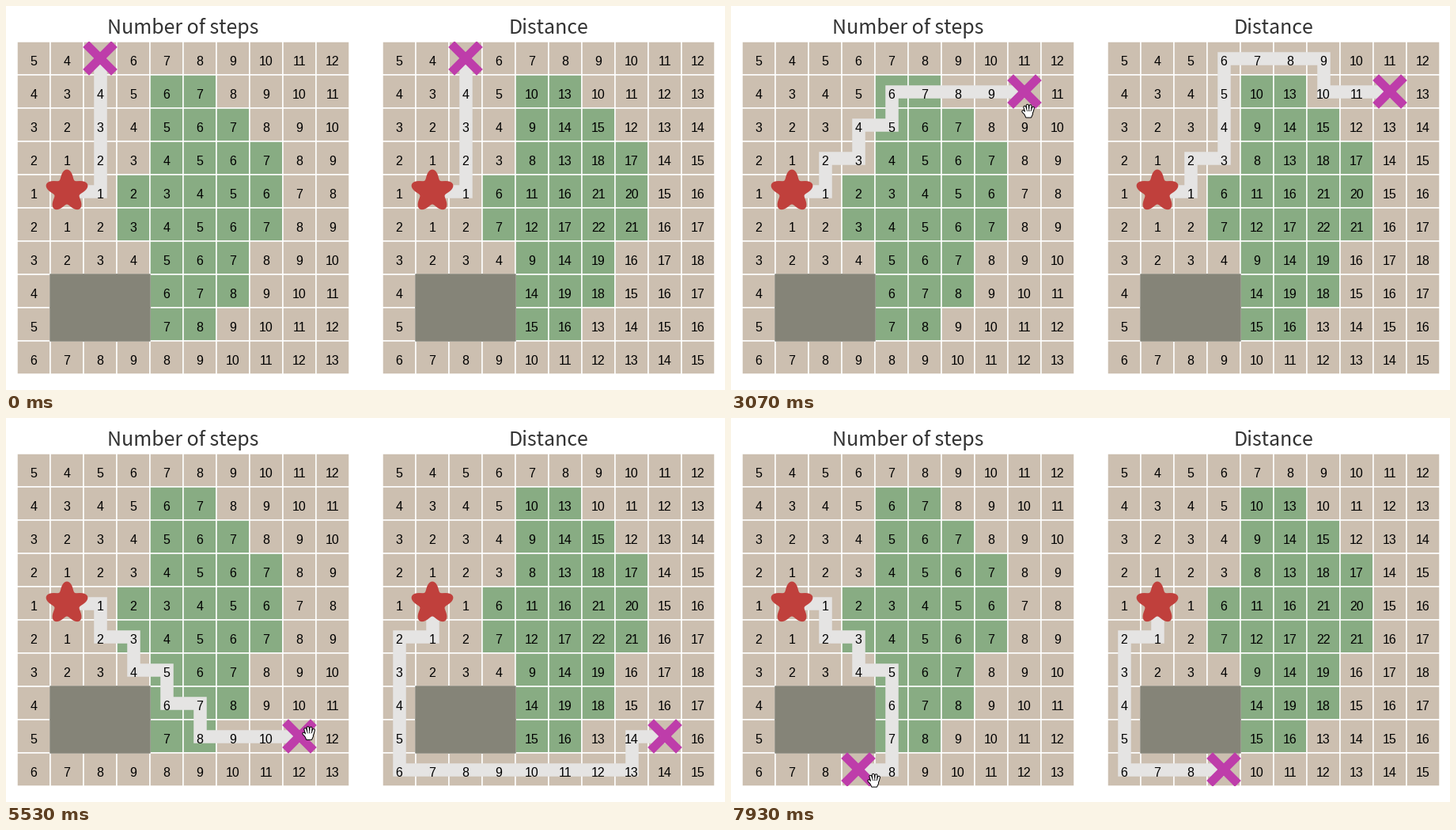
Animation, 909 px wide and 485 px high, one loop 8000 ms. Source, as a matplotlib script:

```python
import math

import matplotlib.pyplot as plt
import numpy as np
from matplotlib.animation import FuncAnimation
from matplotlib.collections import PatchCollection
from matplotlib.patches import Polygon, Rectangle

W, H, DPI = 909, 485, 128
FRAMES, LOOP = 120, 8000
PT = 72 / DPI  # points per pixel
N, CELL, TOP = 10, 42, 45
LEFTS = (14, 476)
START = (1, 4)

SAND, GREEN, WALL = "#ccbfb0", "#88ac83", "#858478"
ROUTE, GOAL, STAR, INK = "#e5e4e3", "#be3daa", "#c0403c", "#333333"

# first and last green column of rows 1 to 8
FOREST = [(4, 5), (4, 6), (4, 7), (3, 7), (3, 7), (4, 6), (4, 6), (4, 5)]
forest = {(x, y) for y, (a, b) in enumerate(FOREST, 1) for x in range(a, b + 1)}
walls = {(x, y) for x in (1, 2, 3) for y in (7, 8)}
cells = [(x, y) for y in range(N) for x in range(N) if (x, y) not in walls]

# pointer: time, x, y
TRACK = np.array([
    (70, 866, 294), (400, 500, 170), (700, 180, 72), (870, 124, 63),
    (1000, 124, 66), (1200, 124, 66), (1730, 201, 70), (2070, 250, 72),
    (2930, 374, 120), (3070, 376, 133), (3600, 394, 186), (4130, 393, 236),
    (5070, 395, 343), (5400, 386, 392), (5530, 380, 404), (6200, 364, 452),
    (7930, 174, 458), (8000, 170, 458)])
GRAB = 1200


def neighbours(cell):
    x, y = cell
    near = [(x + 1, y), (x - 1, y), (x, y + 1), (x, y - 1)]
    return [c for c in near if c in open_cells]


open_cells = set(cells)


def flood(forest_cost):
    """Travel cost from the start to every open cell."""
    cost = {c: forest_cost if c in forest else 1 for c in cells}
    dist = {c: math.inf for c in cells}
    dist[START] = 0
    queue = [START]
    while queue:
        here = queue.pop(0)
        for c in neighbours(here):
            if dist[here] + cost[c] < dist[c]:
                dist[c] = dist[here] + cost[c]
                queue.append(c)
    return dist, cost


def anchor(cell, weighted):
    """Corner from which equally short routes fan out."""
    x, y = cell
    if weighted and x >= 6:
        return (6, 1) if y <= 6 else (6, 9)
    return START


def route(goal, dist, cost, weighted):
    path = [goal]
    while path[-1] != START:
        here = path[-1]
        ax_, ay_ = anchor(here, weighted)
        dx, dy = abs(here[0] - ax_), abs(here[1] - ay_)
        flat = dx > dy or (dx == dy and here[0] < START[0])
        options = [c for c in neighbours(here)
                   if dist[c] + cost[here] == dist[here]]
        path.append(max(options, key=lambda c: ((c[1] == here[1]) == flat, c[0])))
    return path


def centre(cell, left):
    return left + CELL * (cell[0] + 0.5), TOP + CELL * (cell[1] + 0.5)


fig = plt.figure(figsize=(W / DPI, H / DPI), dpi=DPI, facecolor="white")
ax = fig.add_axes([0, 0, 1, 1])
ax.set_xlim(0, W)
ax.set_ylim(H, 0)
ax.axis("off")


class Panel:
    def __init__(self, left, title, forest_cost):
        self.left, self.weighted = left, forest_cost > 1
        self.dist, self.cost = flood(forest_cost)
        ax.text(left + 210, 35, title, ha="center", va="baseline", color=INK,
                family="Noto Sans CJK JP", size=25 * PT)

        order = cells + sorted(walls)
        boxes = [Rectangle((left + CELL * x, TOP + CELL * y), CELL, CELL)
                 for x, y in order]
        fills = [WALL if c in walls else GREEN if c in forest else SAND
                 for c in order]
        edges = [WALL if c in walls else "white" for c in order]
        ax.add_collection(PatchCollection(
            boxes, facecolors=fills, edgecolors=edges, linewidths=1.5 * PT,
            zorder=1))

        self.line, = ax.plot([], [], color=ROUTE, lw=16.5 * PT, zorder=2,
                             solid_capstyle="butt", solid_joinstyle="miter")
        self.labels = {}
        for c in cells:
            if c != START:
                x, y = centre(c, left)
                self.labels[c] = ax.text(
                    x, y + 9, str(self.dist[c]), ha="center", va="baseline",
                    family="Liberation Sans", size=16 * PT, color="black",
                    zorder=3)

        a = np.linspace(0, 2 * np.pi, 120, endpoint=False)
        r = 22 + 5.5 * np.cos(5 * a)
        x, y = centre(START, left)
        ax.add_patch(Polygon(np.c_[x + r * np.sin(a), y - r * np.cos(a)],
                             fc=STAR, ec="none", zorder=4))

        frame = Rectangle((left, TOP), CELL * N, CELL * N, fc="none", ec="none")
        ax.add_patch(frame)
        self.cross, = ax.plot([], [], color=GOAL, lw=11 * PT, zorder=5,
                              solid_capstyle="butt")
        self.cross.set_clip_path(frame)

    def show(self, goal):
        path = route(goal, self.dist, self.cost, self.weighted)
        self.line.set_data(*zip(*(centre(c, self.left) for c in path)))
        for c, label in self.labels.items():
            label.set_visible(c != goal)
        x, y = centre(goal, self.left)
        d = 17.9
        self.cross.set_data([x - d, x + d, np.nan, x - d, x + d],
                            [y - d, y + d, np.nan, y + d, y - d])


panels = [Panel(LEFTS[0], "Number of steps", 1),
          Panel(LEFTS[1], "Distance", 5)]

GAP = (np.nan, np.nan)
FINGERS = np.array([
    (-3, 0), (-4.6, -5), GAP, (-0.5, -1), (-1.2, -7), GAP,
    (2.2, -1), (2.6, -6.5), GAP, (4.6, 1), (6, -4), GAP, (-3, 4), (-6.6, 0.5)])
PALM = np.array([(-4, 0), (5, 0), (5, 4), (3.2, 7.8), (-2.8, 7.8), (-4.5, 4)])
ARROW = np.array([(0, 0), (0, 16), (3.7, 12.6), (6.2, 18), (8.6, 17),
                  (6.2, 11.8), (11, 11.4)])


def finger_line(color, width, z):
    return ax.plot([], [], color=color, lw=width * PT, zorder=z,
                   solid_capstyle="round")[0]


def blank_shape(points, fill, edge, width, z):
    return ax.add_patch(Polygon(points, fc=fill, ec=edge, lw=width * PT,
                                joinstyle="round", zorder=z))


finger_lines = [finger_line("black", 4, 6), finger_line("white", 2, 8)]
palms = [blank_shape(PALM, "black", "black", 2, 7),
         blank_shape(PALM, "white", "none", 0, 8)]
arrow = blank_shape(ARROW, "white", "black", 1, 9)


def goal_at(x, y):
    """Cell under the hand's grip."""
    return int((x - LEFTS[0]) // CELL), max(0, int((y - 6 - TOP) // CELL))


def draw(i):
    t = i * LOOP / FRAMES
    x = np.interp(t, TRACK[:, 0], TRACK[:, 1])
    y = np.interp(t, TRACK[:, 0], TRACK[:, 2])
    goal = goal_at(x, y) if t >= GRAB else (2, 0)
    for p in panels:
        p.show(goal)

    over = t >= GRAB or (abs(x - 119) < 21 and abs(y - 66) < 21)
    for line in finger_lines:
        line.set_data(FINGERS[:, 0] + x, FINGERS[:, 1] + y)
        line.set_visible(over)
    for palm in palms:
        palm.set_xy(PALM + (x, y))
        palm.set_visible(over)
    arrow.set_xy(ARROW + (x, y))
    arrow.set_visible(i > 0 and not over)
    return []


anim = FuncAnimation(fig, draw, frames=FRAMES, interval=LOOP / FRAMES,
                     repeat=True, repeat_delay=0, blit=False)
plt.show()
```
